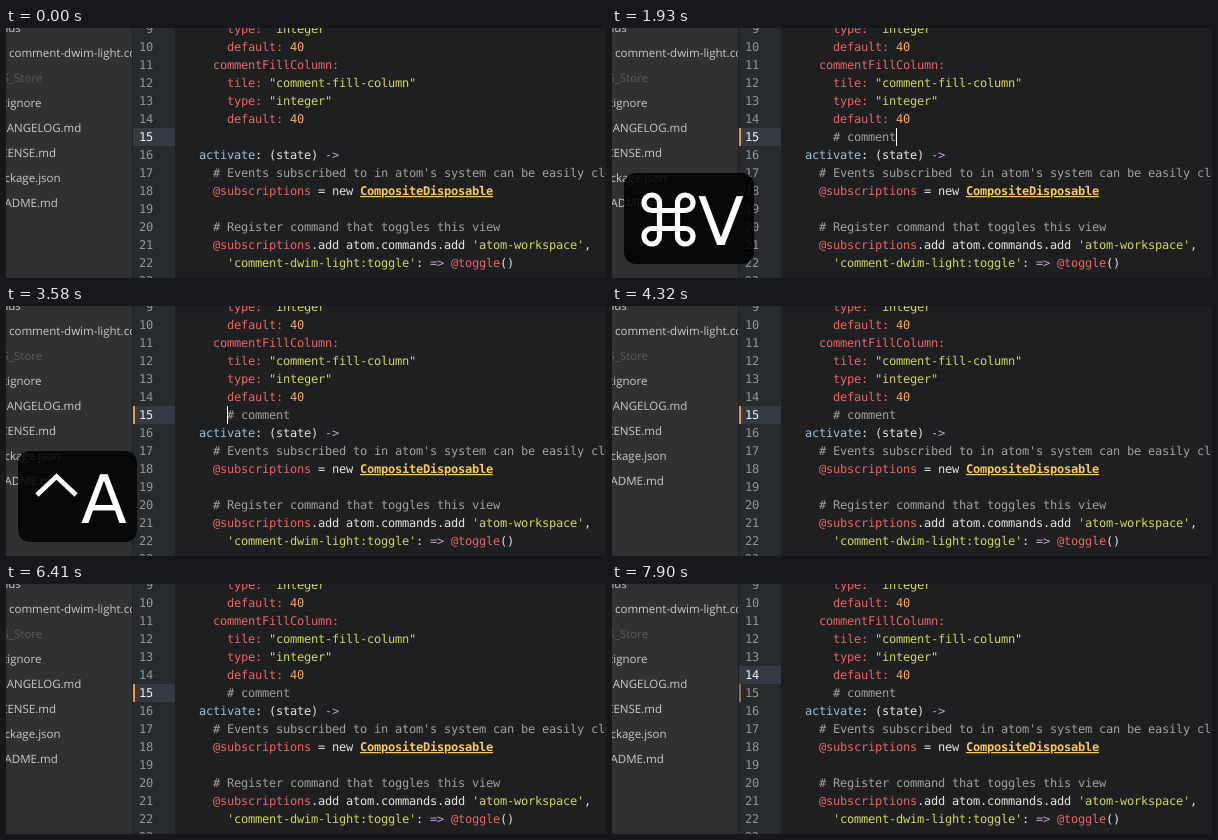
These frames come from a looping animation (600 px wide and 250 px high, 8000 ms). An HTML page:

```html
<!DOCTYPE html>
<html lang="en">
<head>
<meta charset="utf-8">
<title>Comment toggling in an editor</title>
<style>
  html, body { margin: 0; width: 100%; height: 100%; overflow: hidden; background: #1d1f21; }
  svg { display: block; width: 600px; height: 250px; }
  text { white-space: pre; text-rendering: geometricPrecision; }
  .code text { font: 12px "DejaVu Sans Mono", monospace; letter-spacing: -0.224px; }
  .code .cls { font-weight: bold; text-decoration: underline; }
  .tree text { font: 11.5px "Open Sans", sans-serif; fill: #c9c9c9; }
  .tree .dim { fill: #5a5a5a; }
  .keys text { font: 67px "DejaVu Sans", sans-serif; fill: #fff; }
  .keys path { fill: none; stroke: #fff; }
</style>
</head>
<body>
<svg id="stage" viewBox="0 0 600 250"></svg>
<script>
const NS = 'http://www.w3.org/2000/svg';
const stage = document.getElementById('stage');

function add(parent, tag, attrs = {}, text) {
  const el = document.createElementNS(NS, tag);
  for (const name in attrs) el.setAttribute(name, attrs[name]);
  if (text !== undefined) el.textContent = text;
  parent.appendChild(el);
  return el;
}
const rect = (parent, x, y, width, height, fill) =>
  add(parent, 'rect', { x, y, width, height, fill });

const COLS = 179, CHAR = 7, ROW = 18;
const rowTop = n => 100 + (n - 15) * ROW;
const colX = c => COLS + c * CHAR;

const COLORS = {
  red: '#ec6662', str: '#d2d65c', num: '#fba95d', txt: '#e2e4e2',
  rem: '#a0a2a1', fn: '#9bbfdc', op: '#c8a4d2', cls: '#fbc95c'
};

// Each row: line number, first column, then colour/text pairs.
const CODE = [
  [9, 6, 'red', 'type: ', 'str', '"integer"'],
  [10, 6, 'red', 'default: ', 'num', '40'],
  [11, 4, 'red', 'commentFillColumn:'],
  [12, 6, 'red', 'tile: ', 'str', '"comment-fill-column"'],
  [13, 6, 'red', 'type: ', 'str', '"integer"'],
  [14, 6, 'red', 'default: ', 'num', '40'],
  [16, 2, 'fn', 'activate', 'txt', ': (state) ', 'op', '->'],
  [17, 4, 'rem', "# Events subscribed to in atom's system can be easily cleaned up"],
  [18, 4, 'red', '@subscriptions', 'txt', ' = new ', 'cls', 'CompositeDisposable'],
  [20, 4, 'rem', '# Register command that toggles this view'],
  [21, 4, 'red', '@subscriptions', 'txt', '.add atom.commands.add ', 'str', "'atom-workspace'", 'txt', ','],
  [22, 6, 'str', "'comment-dwim-light:toggle'", 'txt', ': ', 'op', '=> ', 'red', '@toggle', 'txt', '()']
];

const TREE = [
  [-22, 'menus'], [3, 'comment-dwim-light.coffee'], [-15, '.DS_Store', 'dim'],
  [-15, '.gitignore'], [-15, 'CHANGELOG.md'], [-15, 'LICENSE.md'],
  [-15, 'package.json'], [-15, 'README.md']
];

// Editor
rect(stage, 0, 0, 600, 250, '#1d1f21');
rect(stage, 127, 0, 42, 250, '#282b2e');
const activeRow = rect(stage, 127, 0, 42, ROW, '#353b44');
const marker = rect(stage, 127, rowTop(15), 2, ROW, '#e8994f');

const code = add(stage, 'g', { class: 'code' });
const codeText = (n, x, fill, text, cls = '') =>
  add(code, 'text', { x, y: rowTop(n) + 13, fill, class: cls }, text);

const numbers = {};
for (let n = 9; n <= 23; n++) numbers[n] = codeText(n, n < 10 ? 140 : 133, '#94979a', n);

for (const [n, first, ...parts] of CODE) {
  let col = first;
  for (let i = 0; i < parts.length; i += 2) {
    codeText(n, colX(col), COLORS[parts[i]], parts[i + 1], parts[i]);
    col += parts[i + 1].length;
  }
}
const comment = codeText(15, colX(6), COLORS.rem, '');
const caret = rect(stage, 0, 0, 1, ROW, '#fff');

// File tree
const tree = add(stage, 'g', { class: 'tree' });
rect(tree, 0, 0, 126, 250, '#303131');
rect(tree, 126, 0, 1, 250, '#1a1b1c');
const clip = add(add(stage, 'clipPath', { id: 'side' }), 'rect', { width: 126, height: 250 });
tree.setAttribute('clip-path', 'url(#side)');
TREE.forEach(([x, name, cls = ''], i) =>
  add(tree, 'text', { x, y: 4 + i * 25, class: cls }, name));

// Pressed-key panels
const keys = add(stage, 'g', { class: 'keys' });
function panel(width, letter, x, draw) {
  const g = add(keys, 'g');
  add(g, 'rect', { x: 12, y: 145, width, height: 91, rx: 12, fill: '#000', 'fill-opacity': 0.86 });
  draw(g);
  const glyph = add(g, 'text', { x, y: 217 }, letter);
  if (letter === ';') {
    glyph.style.stroke = '#fff';
    glyph.style.strokeWidth = 1.5;
  }
  return g;
}
const control = weight => g =>
  add(g, 'path', { d: 'M31 189L50.5 170.5L70 189', 'stroke-width': weight });
const command = g => {
  const loop = 'M-9 -9V-16.5A7.75 7.75 0 1 0 -16.5 -9H-9';
  const frame = 'M-9 -9H9';
  for (let i = 0; i < 4; i++)
    add(g, 'path', {
      d: loop + frame, 'stroke-width': 5.2,
      transform: `translate(56.5 191.5) rotate(${i * 90})`
    });
};
const panels = {
  toggle: panel(94, ';', 73, control(6.2)),
  paste: panel(130, 'V', 86, command),
  home: panel(119, 'A', 75, control(4.6)),
  up: panel(114, 'P', 74, control(4.6))
};

// State changes over one loop
const LOOP = 8000;
const START = { on: false, col: 0, row: 15, text: '', saved: true, key: '' };
const EVENTS = [
  [150, { on: true }],
  [590, { on: false }],
  [740, { on: true, col: 8, text: '# ', key: 'toggle' }],
  [1040, { saved: false }],
  [1190, { on: false }],
  [1640, { on: true, key: '' }],
  [1930, { col: 15, text: '# comment', key: 'paste' }],
  [2530, { on: false }],
  [2830, { on: true, key: '' }],
  [3280, { on: false }],
  [3580, { on: true, col: 6, key: 'home' }],
  [4030, { on: false }],
  [4320, { key: '' }],
  [4470, { on: true }],
  [4770, { on: false }],
  [5070, { on: true, col: 15, key: 'toggle' }],
  [5520, { on: false }],
  [5810, { key: '' }],
  [5960, { on: true }],
  [6410, { on: false }],
  [6560, { on: true, row: 14, key: 'up' }],
  [7150, { on: false }],
  [7450, { on: true, key: '' }],
  [7900, { on: false }]
];

const show = (el, visible) => el.setAttribute('visibility', visible ? 'visible' : 'hidden');

function render(t) {
  const s = Object.assign({}, START, ...EVENTS.filter(e => e[0] <= t).map(e => e[1]));
  const y = rowTop(s.row);
  activeRow.setAttribute('y', y);
  for (const n of [14, 15]) numbers[n].setAttribute('fill', n === s.row ? '#f2f3f2' : '#94979a');
  show(marker, !s.saved);
  marker.setAttribute('fill-opacity', s.row === 15 ? 1 : 0.6);
  if (comment.textContent !== s.text) comment.textContent = s.text;
  caret.setAttribute('x', colX(s.col));
  caret.setAttribute('y', y);
  show(caret, s.on);
  for (const name in panels) show(panels[name], name === s.key);
}

const begin = performance.now();
function tick() {
  render((performance.now() - begin) % LOOP);
  requestAnimationFrame(tick);
}
render(0);
requestAnimationFrame(tick);
</script>
</body>
</html>
```
